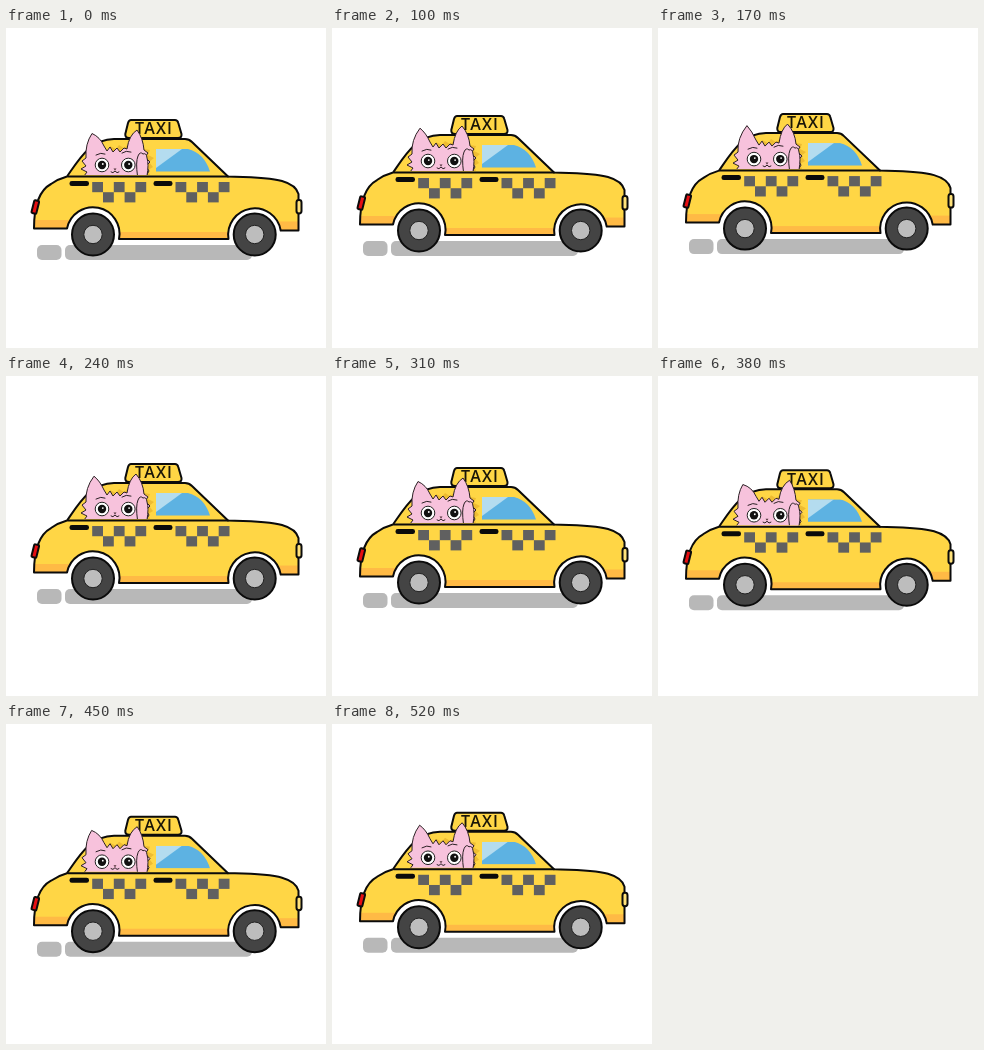
Recreate the animation shown at these times as an HTML page. Size 320x320 px, loop 590 ms.

```html
<!DOCTYPE html>
<html lang="en">
<head>
<meta charset="utf-8">
<title>Taxi ride</title>
<style>
  html, body { margin: 0; width: 100%; height: 100%; overflow: hidden; background: #fff; }
  svg { display: block; width: 100vw; height: 100vh; }
  .line { stroke: #0b0b0b; stroke-width: 2; stroke-linejoin: round; stroke-linecap: round; }
  .thin { stroke: #2b2024; stroke-width: 1; stroke-linejoin: round; stroke-linecap: round; }
  .none { fill: none; }
  text { font: 600 16px "Open Sans", "Noto Sans", sans-serif; letter-spacing: 1.2px; fill: #1a1608; }
</style>
</head>
<body>
<svg viewBox="0 0 320 320">
  <defs>
    <path id="shell" d="M28 200.5 C28 180 32 163 45 156 Q52 151 61 148.5 C72 133 84 111 108 111 H179 Q183 111 186 114 L222 148.5 C240 149 262 149 276 153 Q290 157 292.5 166 V202.5 H274.7 A26.4 26.4 0 0 0 222.5 211 H113 A26.5 26.5 0 0 0 61 200.5 Z"/>
    <clipPath id="inside"><use href="#shell"/></clipPath>
    <clipPath id="glass"><path d="M150 121 H182 Q198 125 204 143.5 H150 Z"/></clipPath>
    <clipPath id="sill"><rect x="60" y="90" width="100" height="57"/></clipPath>
    <g id="wheel">
      <circle r="21" fill="#444" class="line"/>
      <circle r="9.2" fill="#bdbdbd" stroke="#222" stroke-width="1"/>
    </g>
  </defs>

  <g id="car">
    <g fill="#b8b8b8">
      <rect x="31" y="217" width="24.5" height="15" rx="5"/>
      <rect x="59" y="217" width="187" height="15" rx="5"/>
    </g>

    <use href="#shell" fill="#ffd645"/>
    <g clip-path="url(#inside)" fill="#ffba45">
      <rect x="26" y="192" width="38" height="12"/>
      <rect x="106" y="204" width="124" height="10"/>
      <rect x="270" y="193.5" width="30" height="12"/>
    </g>
    <use href="#shell" class="line none"/>
    <path d="M62 148.5 H222" class="line none"/>
    <rect x="26.8" y="172.5" width="5" height="13" rx="1" fill="#e60f12" class="line" transform="rotate(14 29.3 179)"/>
    <rect x="290.5" y="172" width="5" height="13.5" rx="2.4" fill="#ffe27a" class="line"/>

    <g clip-path="url(#glass)">
      <rect x="150" y="121" width="55" height="23" fill="#5db2e2"/>
      <path d="M150 121 H176 L150 140 Z" fill="#b4dcef"/>
    </g>

    <path d="M125 92 H169 Q171.5 92 172.3 95 L175.5 106 Q176 110 172 110 H123 Q119 110 119.3 106 L122 95 Q123 92 125 92 Z" fill="#ffd645" class="line"/>
    <text x="129" y="106.3">TAXI</text>

    <g clip-path="url(#sill)">
      <path d="M104 118 L110 121 L113 117 L118 120 L123 116 L128 119 L136 117 L138 121 L144 122 L142 127 L148 130 L143 134 L147 139 L142 142 L144 147 H104 Z" fill="#eebc32"/>
      <path id="head" fill="#f7c2dc" class="thin"/>
      <path d="M90 127 Q95 124 99 126 M116 125 Q120 122 125 124" class="thin none"/>
      <g id="eyes"></g>
      <path d="M107.5 140.5 h3 l-1.5 2 Z" fill="#503039"/>
      <path d="M105 144 Q107 146 109 143 Q111 146 113 144" class="thin none"/>
      <path d="M131.5 148 Q129.5 134 132 128 Q134 123 137 126 Q140.5 124.500 141 130 Q143 136 141 148 Z" fill="#f7c2dc" class="thin"/>
    </g>

    <g fill="#0b0b0b">
      <rect x="63.5" y="153" width="19.5" height="5" rx="2.3"/>
      <rect x="147.5" y="153" width="19" height="5" rx="2.3"/>
    </g>
    <g id="checks" fill="#606060"></g>
    <use href="#wheel" x="87" y="206.5"/>
    <use href="#wheel" x="248.7" y="206.5"/>
  </g>
</svg>
<script>
const LOOP = 590, HOLD = 100, STEP = 70;
const SWING = 4.1, PERIOD = 6.2, PHASE = 1.1; // bob height in px, period and phase in steps
const el = id => document.getElementById(id);
const wave = step => SWING * Math.cos(2 * Math.PI * (step + PHASE) / PERIOD);

el("checks").innerHTML = [86.2, 169.5].map(x =>
  [0, 1, 2, 3, 4].map(i =>
    `<rect x="${x + i * 10.8}" y="${154 + i % 2 * 10.2}" width="10.8" height="10.2"/>`
  ).join("")).join("");

el("eyes").innerHTML = [96, 122.3].map(x => `
  <circle cx="${x}" cy="137" r="6.8" fill="#fff" stroke="#222" stroke-width="1"/>
  <circle cx="${x}" cy="137" r="4.2" fill="#111"/>
  <circle cx="${x + .8}" cy="136" r=".9" fill="#fff"/>`).join("");

function pose(step) {
  const y = wave(step) - wave(0);
  el("car").setAttribute("transform", `translate(0 ${y.toFixed(2)})`);
  // The ears lean a little as the car rises.
  const left = `${86 - y / 2} ${105.5 + y / 3}`, right = `${131 + y / 4} ${102}`;
  el("head").setAttribute("d", `M78 148 L81 144 L75 141 L80 138 L76 133 L80 130 Q79 116 ${left}
    Q94 109 98 118 L101 123 L104 119 L107 124 L111 120 L114 124 L118 120 L121 121
    Q123 107 ${right} Q137 110 138 122 L142 125 L139 129 L144 134 L140 138 L143 143 L140 148 Z`);
}

function frame(now) {
  const t = now % LOOP;
  pose(t < HOLD ? 0 : 1 + Math.floor((t - HOLD) / STEP));
  requestAnimationFrame(frame);
}
pose(0);
requestAnimationFrame(frame);
</script>
</body>
</html>
```
